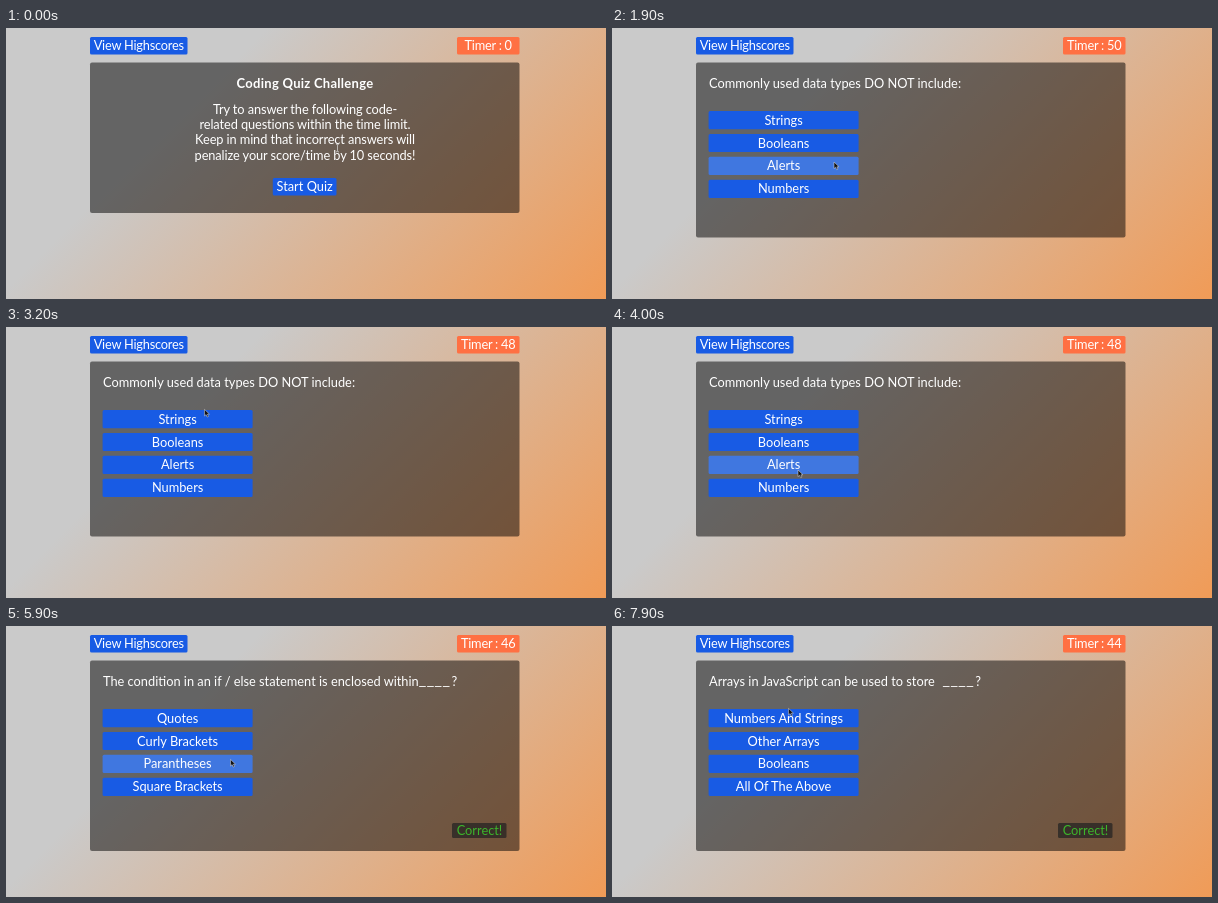
These frames come from a looping animation (600 by 271 pixels, 8 s). An HTML page:

```html
<!DOCTYPE html>
<html lang="en">
<head>
<meta charset="utf-8">
<title>Coding Quiz Challenge</title>
<style>
  html, body { margin: 0; width: 100%; height: 100%; overflow: hidden; }
  body { background: linear-gradient(135deg, #cacaca 30%, #f09b57 100%); }
  svg { display: block; width: 600px; height: 271px; }
  text { font: 12.8px Lato, sans-serif; fill: #fff; white-space: pre; }
  .mid { text-anchor: middle; }
  .title { font-size: 13px; font-weight: 700; letter-spacing: .27px; }
  .intro { letter-spacing: -.1px; }
  .blank { font-family: "DejaVu Sans", sans-serif; letter-spacing: 1.5px; }
  .btn rect { fill: #185be4; }
  .btn.hover rect { fill: #4077e0; }
  .btn { transform-box: fill-box; transform-origin: center; }
  .btn.down { transform: scale(.985); }
  #panel { fill: #000; fill-opacity: .5; }
</style>
</head>
<body>
<svg viewBox="0 0 600 271"></svg>
<script>
const LOOP = 8000;
const START = 1100;
const TOP = 34.5;
const svg = document.querySelector("svg");

// start time, panel bottom, question with its blank's x, answers
const questions = [
  { at: START, bottom: 209.5, text: "Commonly used data types DO NOT include:",
    answers: ["Strings", "Booleans", "Alerts", "Numbers"] },
  { at: 4300, bottom: 225, text: "The condition in an if / else statement is enclosed within", blank: 413.3,
    answers: ["Quotes", "Curly Brackets", "Parantheses", "Square Brackets"] },
  { at: 6600, bottom: 225, text: "Arrays in JavaScript can be used to store", blank: 331,
    answers: ["Numbers And Strings", "Other Arrays", "Booleans", "All Of The Above"] }
];

// time, x, y of the pointer tip
const path = [
  [0, 330, 116], [100, 330, 116], [700, 300, 157], [1050, 300, 157],
  [1900, 222, 134], [2300, 222, 134], [3200, 198.5, 82.4], [4000, 186, 143],
  [4300, 186, 143], [5000, 242.5, 134.5], [5400, 242.5, 134.5],
  [6500, 201, 132], [6800, 201, 132], [7900, 176.5, 82.4], [8000, 176.5, 82.4]
];
const presses = [[1000, 1100], [4200, 4300], [6450, 6600]];

const label = (text, x, y, cls = "", spacing = 0) =>
  `<text class="${cls}" x="${x}" y="${y}"${spacing ? ` letter-spacing="${spacing}"` : ""}>${text}</text>`;

const button = (text, x, y, w, h, spacing) =>
  `<g class="btn" data-box="${x},${y},${w},${h}">
    <rect x="${x}" y="${y}" width="${w}" height="${h}" rx="1.5"/>
    ${label(text, x + w / 2, y + h / 2 + 4.5, "mid", spacing)}</g>`;

const intro = () => `<g class="scene">
  ${label("Coding Quiz Challenge", 299, 60, "mid title")}
  ${["Try to answer the following code-",
     "related questions within the time limit.",
     "Keep in mind that incorrect answers will",
     "penalize your score/time by 10 seconds!"]
    .map((line, i) => label(line, 299, 85.6 + i * 15.4, "mid intro")).join("")}
  ${button("Start Quiz", 266.8, 150, 63.7, 17.5)}</g>`;

const question = q => `<g class="scene">
  ${label(q.text, 97, 60)}
  ${q.blank ? label("____", q.blank, 58.2, "blank") + label("?", q.blank + 32.2, 60) : ""}
  ${q.answers.map((a, i) => button(a, 96.6, 83 + i * 22.9, 150, 18.2)).join("")}</g>`;

svg.innerHTML = `
  ${button("View Highscores", 84, 9, 97.5, 17.5, -.22)}
  <rect x="451" y="9" width="62.5" height="17.5" rx="1.5" fill="#ff7043"/>
  ${label("", 482.2, 22.2, "mid timer", -.25)}
  <rect id="panel" x="84" y="${TOP}" width="429.5" height="150" rx="2"/>
  ${intro()}${questions.map(question).join("")}
  <g id="verdict">
    <rect x="446" y="197" width="54.5" height="15" rx="1.5" fill="#222" fill-opacity=".72"/>
    <text class="mid" x="473.5" y="209" style="fill:#3db52b">Correct!</text>
  </g>
  <path id="arrow" d="M0 0V6.6L1.6 5.2L2.7 7.6L3.9 7.1L2.9 4.8H5Z" fill="#111" stroke="#ddd" stroke-width=".5"/>
  <path id="beam" d="M0 0Q1.5 0 1.5 1.2V6.8Q1.5 8 0 8M3 0Q1.5 0 1.5 1.2M3 8Q1.5 8 1.5 6.8"
    fill="none" stroke="#ddd" stroke-width=".7"/>`;

const $ = s => svg.querySelector(s);
const panel = $("#panel"), timer = $(".timer"), verdict = $("#verdict");
const arrow = $("#arrow"), beam = $("#beam");
const scenes = [...svg.querySelectorAll(".scene")];
const buttons = [...svg.querySelectorAll(".btn")].map(el => ({
  el, scene: el.closest(".scene"), box: el.dataset.box.split(",").map(Number)
}));
const show = (el, on) => el.setAttribute("visibility", on ? "visible" : "hidden");

function pointerAt(t) {
  const i = Math.max(1, path.findIndex(p => p[0] >= t));
  const [t0, x0, y0] = path[i - 1], [t1, x1, y1] = path[i];
  const k = (t - t0) / (t1 - t0), e = k * k * (3 - 2 * k);
  return [x0 + (x1 - x0) * e, y0 + (y1 - y0) * e];
}

function render(t) {
  const index = questions.filter(q => t >= q.at).length;
  scenes.forEach((s, i) => show(s, i === index));
  panel.setAttribute("height", (index ? questions[index - 1].bottom : 185) - TOP);
  show(verdict, index > 1);
  timer.textContent = "Timer : " + (index ? 50 - Math.floor((t - START) / 1000) : 0);

  const [x, y] = pointerAt(t);
  const pressed = presses.some(([a, b]) => t >= a && t < b);
  for (const { el, scene, box: [bx, by, w, h] } of buttons) {
    const over = (!scene || scene === scenes[index]) &&
      x >= bx && x <= bx + w && y >= by && y <= by + h;
    el.classList.toggle("hover", over);
    el.classList.toggle("down", over && pressed);
  }
  const onText = !index && y < 134;
  show(beam, onText);
  show(arrow, !onText);
  for (const el of [arrow, beam]) el.setAttribute("transform", `translate(${x} ${y})`);
}

const begin = performance.now();
function tick() {
  render((performance.now() - begin) % LOOP);
  requestAnimationFrame(tick);
}
tick();
</script>
</body>
</html>
```
